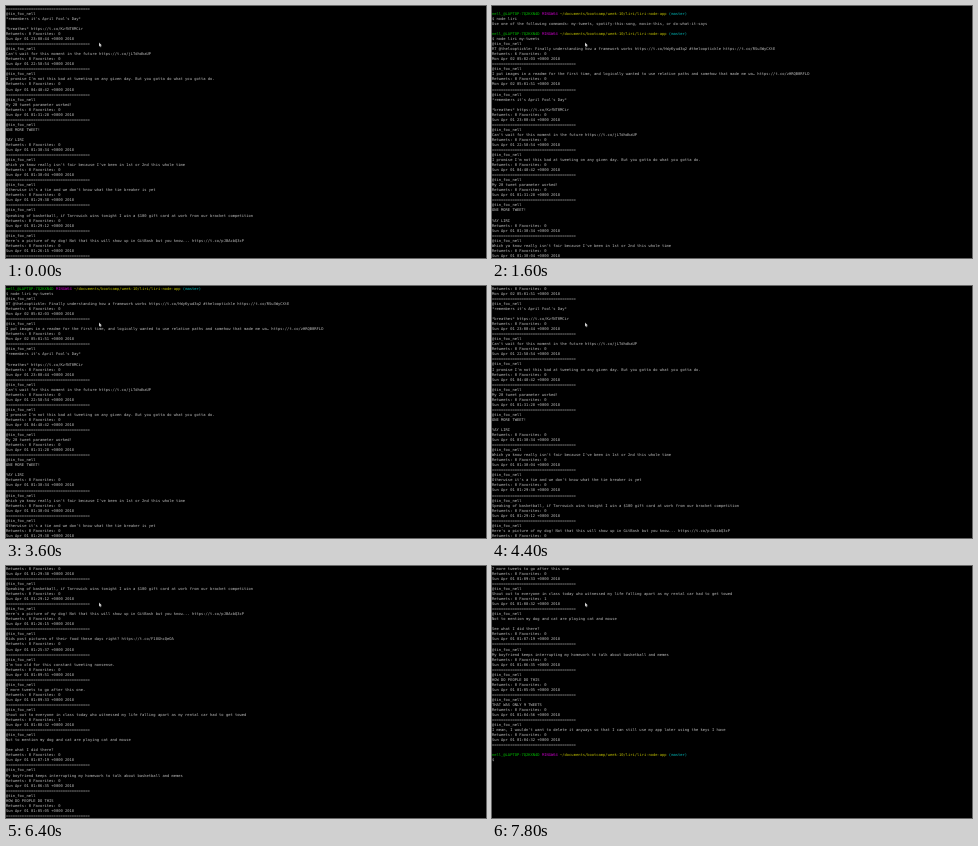
An HTML page for the animation above (8 s loop, 480x252 px).

```html
<!DOCTYPE html>
<html lang="en">
<head>
<meta charset="utf-8">
<title>Terminal scrollback</title>
<style>
  html, body { margin: 0; width: 100%; height: 100%; overflow: hidden; background: #000; }
  svg { display: block; width: 100vw; height: 100vh; }
  text {
    font-family: "DejaVu Sans Mono", "Liberation Mono", monospace;
    font-size: 3.78px;
    fill: #bfbfbf;
    white-space: pre;
    text-rendering: geometricPrecision;
  }
</style>
</head>
<body>
<svg viewBox="0 0 480 252">
  <rect width="480" height="252" fill="#000"/>
  <g id="log"></g>
  <path d="M93 36.6v4.1l1-.9.7 1.5.7-.3-.7-1.5h1.3z" fill="#eee" stroke="#000" stroke-width=".2"/>
</svg>
<script>
const LOOP = 8000;
const ROW = 5.04;
const FIRST_ROW = -5;
const HANDLE = "@tin_fox_nell";
const RULE = "=".repeat(37);
const link = id => "https://t.co/" + id;

const PROMPT = [
  ["nell_@LAPTOP-7Q2KXN4D ", "#00bf00"],
  ["MINGW64 ", "#bf00bf"],
  ["~/documents/bootcamp/week-10/liri/liri-node-app ", "#bfbf00"],
  ["(master)", "#00bfbf"]
];

// [text, time, retweets, favorites]
const tweets = [
  ["RT @thelooptickle: Finally understanding how a framework works " + link("hWyKyud3q2") +
    " #thelooptickle " + link("RSu3WyCXtE"), "Mon Apr 02 05:02:03", 6],
  ["I put images in a readme for the first time, and logically wanted to use relative paths " +
    "and somehow that made me wa… " + link("zHRQB0RFLD"), "Mon Apr 02 05:01:51"],
  ["*remembers it's April Fool's Day*\n\n*breathes* " + link("KzfNT0MCir"), "23:00:44"],
  ["Can't wait for this moment in the future " + link("jLTdhdkaUP"), "22:58:54"],
  ["I promise I'm not this bad at tweeting on any given day. But you gotta do what you gotta do.", "04:48:42"],
  ["My 20 tweet parameter worked!", "01:31:28"],
  ["ONE MORE TWEET!\n\nYAY LIRI", "01:30:34"],
  ["Which ya know really isn't fair because I've been in 1st or 2nd this whole time", "01:30:04"],
  ["Otherwise it's a tie and we don't know what the tie breaker is yet", "01:29:38"],
  ["Speaking of basketball, if Tarrowick wins tonight I win a $100 gift card at work from our bracket competition", "01:29:12"],
  ["Here's a picture of my dog! Not that this will show up in GitBash but you know... " + link("pJBAcbQ3cP"), "01:26:15"],
  ["Kids post pictures of their food these days right? " + link("F18GhcQeOA"), "01:25:37"],
  ["I'm too old for this constant tweeting nonsense.", "01:09:51"],
  ["7 more tweets to go after this one.", "01:09:33"],
  ["Shout out to everyone in class today who witnessed my life falling apart as my rental car had to get towed", "01:08:32", 0, 1],
  ["Not to mention my dog and cat are playing cat and mouse\n\nSee what I did there?", "01:07:19"],
  ["My boyfriend keeps interrupting my homework to talk about basketball and memes", "01:06:35"],
  ["HOW DO PEOPLE DO THIS", "01:05:05"],
  ["THAT WAS ONLY 9 TWEETS", "01:04:56"],
  ["I mean, I wouldn't want to delete it anyways so that I can still use my app later using the keys I have", "01:04:32"]
];

const tweetLines = ([text, time, retweets = 0, favorites = 0]) => [
  HANDLE,
  ...text.split("\n"),
  `Retweets: ${retweets} Favorites: ${favorites}`,
  `${time.length > 8 ? time : "Sun Apr 01 " + time} +0000 2018`,
  RULE
];

const lines = [
  "", PROMPT, "$ node liri",
  "Use one of the following commands: my-tweets, spotify-this-song, movie-this, or do-what-it-says",
  "", PROMPT, "$ node liri my-tweets",
  ...tweets.flatMap(tweetLines),
  "", PROMPT, "$"
];

// [time in ms, row at the top of the window]
const scroll = [
  [0, 11], [200, 8], [400, 5], [600, 3], [1000, 1], [1200, -1], [1400, -3], [1600, -5],
  [3400, -3], [3600, 0], [3800, 2], [4000, 4], [4200, 6], [4400, 9],
  [4600, 12], [4800, 15], [5000, 18], [5200, 21], [5400, 25],
  [5600, 31], [5800, 38], [6000, 44], [6400, 48], [6600, 52], [6800, 56],
  [7200, 60], [7400, 64], [7600, 68], [7800, 72]
];

const log = document.getElementById("log");

function add(parent, tag, attrs, content = "") {
  const node = document.createElementNS("http://www.w3.org/2000/svg", tag);
  for (const key in attrs) node.setAttribute(key, attrs[key]);
  node.textContent = content;
  return parent.appendChild(node);
}

lines.forEach((line, i) => {
  if (!line) return;
  const text = add(log, "text", { x: 0, y: (i + FIRST_ROW) * ROW + 3.9 });
  if (line === PROMPT) {
    for (const [part, color] of line) add(text, "tspan", { style: "fill:" + color }, part);
  } else {
    text.textContent = line;
  }
});

function render(now) {
  const t = now % LOOP;
  const [, top] = scroll.findLast(([start]) => start <= t);
  log.setAttribute("transform", `translate(0 ${-top * ROW})`);
}

const begin = performance.now();
function tick() {
  render(performance.now() - begin);
  requestAnimationFrame(tick);
}
render(0);
requestAnimationFrame(tick);
</script>
</body>
</html>
```
